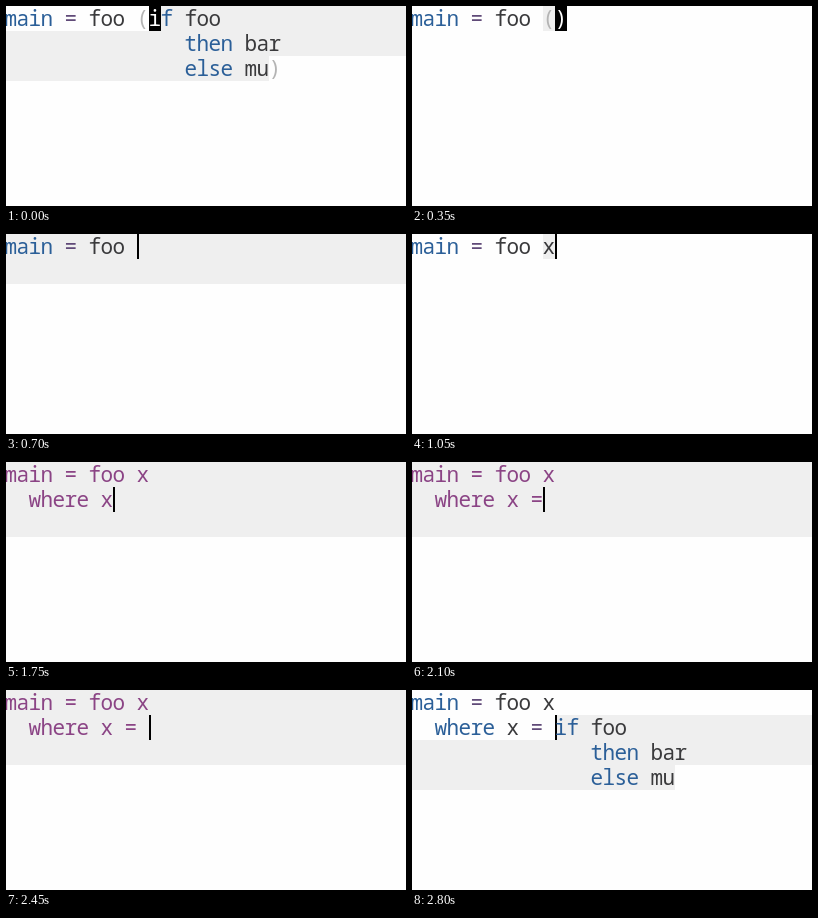
An HTML page that plays this animation: 400x200 px, repeating every 3500 ms.

```html
<!DOCTYPE html>
<html lang="en">
<head>
<meta charset="utf-8">
<title>Code editing</title>
<style>
  html, body { margin: 0; width: 100%; height: 100%; overflow: hidden; background: #fefefe; }
  svg { display: block; width: 400px; height: 200px; }
  text {
    font: 21px "Noto Sans Mono", "DejaVu Sans Mono", monospace;
    letter-spacing: -0.6px;
    white-space: pre;
  }
  .key { fill: #2b5f98; }
  .op { fill: #604a78; }
  .name { fill: #3a3a3c; }
  .paren { fill: #b4b4b4; }
  .error { fill: #8b4485; }
  .inverse { fill: #fff; }
  .region { fill: #efefef; }
  .cursor { fill: #000; }
</style>
</head>
<body>
<svg id="stage" viewBox="0 0 400 200"></svg>
<script>
const CELL = 12, LINE = 25, LEFT = -1, STEP = 350, LOOP = 3500;
const BASELINE = 20, NUDGE = -0.6; // centres glyphs in their cells
const stage = document.getElementById('stage');
const colX = col => LEFT + col * CELL;

function add(parent, tag, attrs, content = '') {
  const node = document.createElementNS('http://www.w3.org/2000/svg', tag);
  for (const key in attrs) node.setAttribute(key, attrs[key]);
  node.textContent = content;
  parent.append(node);
  return node;
}

// Tokens are [row, column, text, class].
const head = [[0, 0, 'main', 'key'], [0, 5, '=', 'op'], [0, 7, 'foo', 'name']];
const call = [...head, [0, 11, 'x', 'name']];
const branches = row => [
  [row, 15, 'foo', 'name'],
  [row + 1, 15, 'then', 'key'], [row + 1, 20, 'bar', 'name'],
  [row + 2, 15, 'else', 'key'], [row + 2, 20, 'mu', 'name']
];
const broken = tail => [[0, 0, 'main = foo x', 'error'], [1, 2, tail, 'error']];

// Regions are [x, row, right, rows].
const branchRegion = row => [
  [colX(12), row, 400, 1], [0, row + 1, 400, 1], [0, row + 2, colX(22), 1]
];
const cell = col => [[colX(col), 0, colX(col + 1), 1]];
const whole = rows => [[0, 0, 400, rows]];

// Cursors are [row, column, width].
const steps = [
  { region: branchRegion(0), cursor: [0, 12, CELL],
    text: [...head, [0, 11, '(', 'paren'], [0, 12, 'i', 'inverse'], [0, 13, 'f', 'key'],
      ...branches(0), [2, 22, ')', 'paren']] },
  { region: cell(11), cursor: [0, 12, CELL],
    text: [...head, [0, 11, '(', 'paren'], [0, 12, ')', 'inverse']] },
  { region: whole(2), cursor: [0, 11, 2], text: head },
  { region: cell(11), cursor: [0, 12, 2], text: call },
  { region: whole(3), cursor: [1, 0, 2], text: call },
  { region: whole(3), cursor: [1, 9, 2], text: broken('where x') },
  { region: whole(3), cursor: [1, 11, 2], text: broken('where x =') },
  { region: whole(3), cursor: [1, 12, 2], text: broken('where x = ') },
  { region: branchRegion(1), cursor: [1, 12, 2],
    text: [...call, [1, 2, 'where', 'key'], [1, 8, 'x', 'name'], [1, 10, '=', 'op'],
      [1, 12, 'if', 'key'], ...branches(1)] }
];

const views = steps.map(({ region, cursor, text }) => {
  const view = add(stage, 'g', { visibility: 'hidden' });
  for (const [x, row, right, rows] of region)
    add(view, 'rect', { class: 'region', x, y: row * LINE, width: right - x, height: rows * LINE });
  const [row, col, width] = cursor;
  add(view, 'rect', { class: 'cursor', x: colX(col), y: row * LINE, width, height: LINE });
  for (const [line, at, str, kind] of text)
    add(view, 'text', { class: kind, x: colX(at) + NUDGE, y: line * LINE + BASELINE }, str);
  return view;
});

const start = performance.now();
let shown = -1;
function draw(now) {
  const time = Math.max(0, now - start) % LOOP;
  const next = Math.min(Math.floor(time / STEP), views.length - 1);
  if (next !== shown) {
    views.forEach((view, i) => view.setAttribute('visibility', i === next ? 'visible' : 'hidden'));
    shown = next;
  }
  requestAnimationFrame(draw);
}
draw(start);
</script>
</body>
</html>
```
